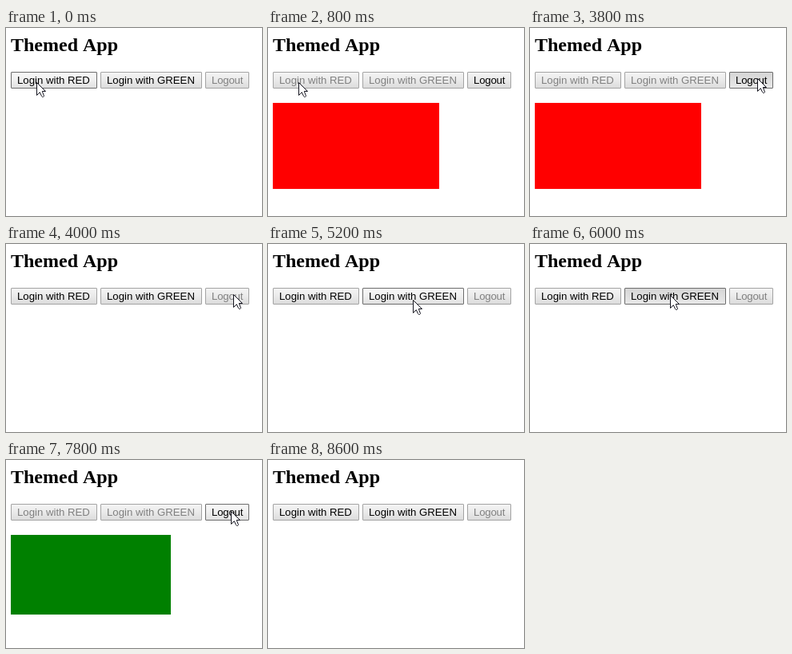
An HTML page for the animation above (10000 ms loop, 320 by 236 pixels).

```html
<!DOCTYPE html>
<html lang="en">
<head>
<meta charset="utf-8">
<title>Themed App</title>
<style>
:root {
  --face: linear-gradient(#f4f4f4, #ebebeb 45%, #dcdcdc);
  --lit: linear-gradient(#f8f8f8, #f0f0f0 45%, #e1e1e1);
  --down: linear-gradient(#d6d6d6, #e0e0e0 55%, #e8e8e8);
  --edge: #a3a3a3;
  --dark: #6c6c6c;
  --off: #808080;
}
html, body { margin: 0; width: 100%; height: 100%; overflow: hidden; background: #fff; }
.stage { position: relative; width: 320px; height: 236px; overflow: hidden; font-kerning: none; }
.stage > * { position: absolute; box-sizing: border-box; animation: 10s step-end infinite; }

h1 {
  left: 6px; top: 8px; margin: 0;
  font: bold 24px/26px "Liberation Serif", "Times New Roman", serif;
  font-kerning: none; white-space: nowrap;
}
.btn {
  top: 55px; height: 21px; padding-left: 7px;
  border: 1px solid var(--edge); border-radius: 1px;
  background: var(--face); color: #000;
  font: 13.2px/19px "Liberation Sans", Arial, sans-serif;
  font-kerning: none; white-space: nowrap; cursor: default;
}
.red { left: 6px; width: 108px; animation-name: red; }
.green { left: 118px; width: 127px; animation-name: green; }
.logout { left: 249px; width: 55px; letter-spacing: -.2px; animation-name: logout; }
.panel { left: 6px; top: 94px; visibility: hidden; animation-name: panel; }
.cursor { left: 0; top: 0; width: 12px; height: 19px; animation-name: move; }

@keyframes red {
  0% { background: var(--lit); border-color: var(--dark); color: #000; }
  8%, 62% { background: var(--face); border-color: var(--edge); color: var(--off); }
  40%, 82% { background: var(--face); border-color: var(--edge); color: #000; }
}
@keyframes green {
  0%, 40%, 82% { background: var(--face); border-color: var(--edge); color: #000; }
  8%, 62% { background: var(--face); border-color: var(--edge); color: var(--off); }
  52% { background: var(--lit); border-color: var(--dark); color: #000; }
  60% { background: var(--down); border-color: var(--dark); color: #000; }
}
@keyframes logout {
  0%, 40%, 82% { background: var(--face); border-color: var(--edge); color: var(--off); }
  8%, 62% { background: var(--face); border-color: var(--edge); color: #000; }
  30%, 76% { background: var(--lit); border-color: var(--dark); color: #000; }
  38%, 80% { background: var(--down); border-color: var(--dark); color: #000; }
}
@keyframes panel {
  0%, 40%, 82% { visibility: hidden; }
  8% { visibility: visible; width: 208px; height: 108px; background: #f00; }
  62% { visibility: visible; width: 200px; height: 100px; background: #008000; }
}
@keyframes move {
  0% { transform: translate(38px, 68px); }
  20% { transform: translate(54px, 76px); }
  22% { transform: translate(100px, 88px); }
  24% { transform: translate(160px, 91px); }
  26% { transform: translate(214px, 91px); }
  28% { transform: translate(244px, 87px); }
  30% { transform: translate(275px, 71px); }
  32% { transform: translate(284px, 63px); }
  48% { transform: translate(266px, 71px); }
  50% { transform: translate(220px, 76px); }
  52% { transform: translate(181px, 70px); }
  54% { transform: translate(177px, 66px); }
  56% { transform: translate(175px, 64px); }
  70% { transform: translate(186px, 73px); }
  72% { transform: translate(214px, 85px); }
  74% { transform: translate(246px, 86px); }
  76% { transform: translate(272px, 72px); }
  78% { transform: translate(281px, 64px); opacity: 1; }
  86% { transform: translate(281px, 64px); opacity: 0; }
}
</style>
</head>
<body>
<div class="stage">
  <h1>Themed App</h1>
  <div class="btn red">Login with RED</div>
  <div class="btn green">Login with GREEN</div>
  <div class="btn logout">Logout</div>
  <div class="panel"></div>
  <svg class="cursor" viewBox="0 0 12 19">
    <path d="M.5 .5V16.5L4.3 12.7L6.5 17.5L7.4 18.5H8.6L9.5 17.3L7.3 11.5H11.5Z" fill="#fff" stroke="#14141f" stroke-linejoin="round"/>
  </svg>
</div>
</body>
</html>
```
